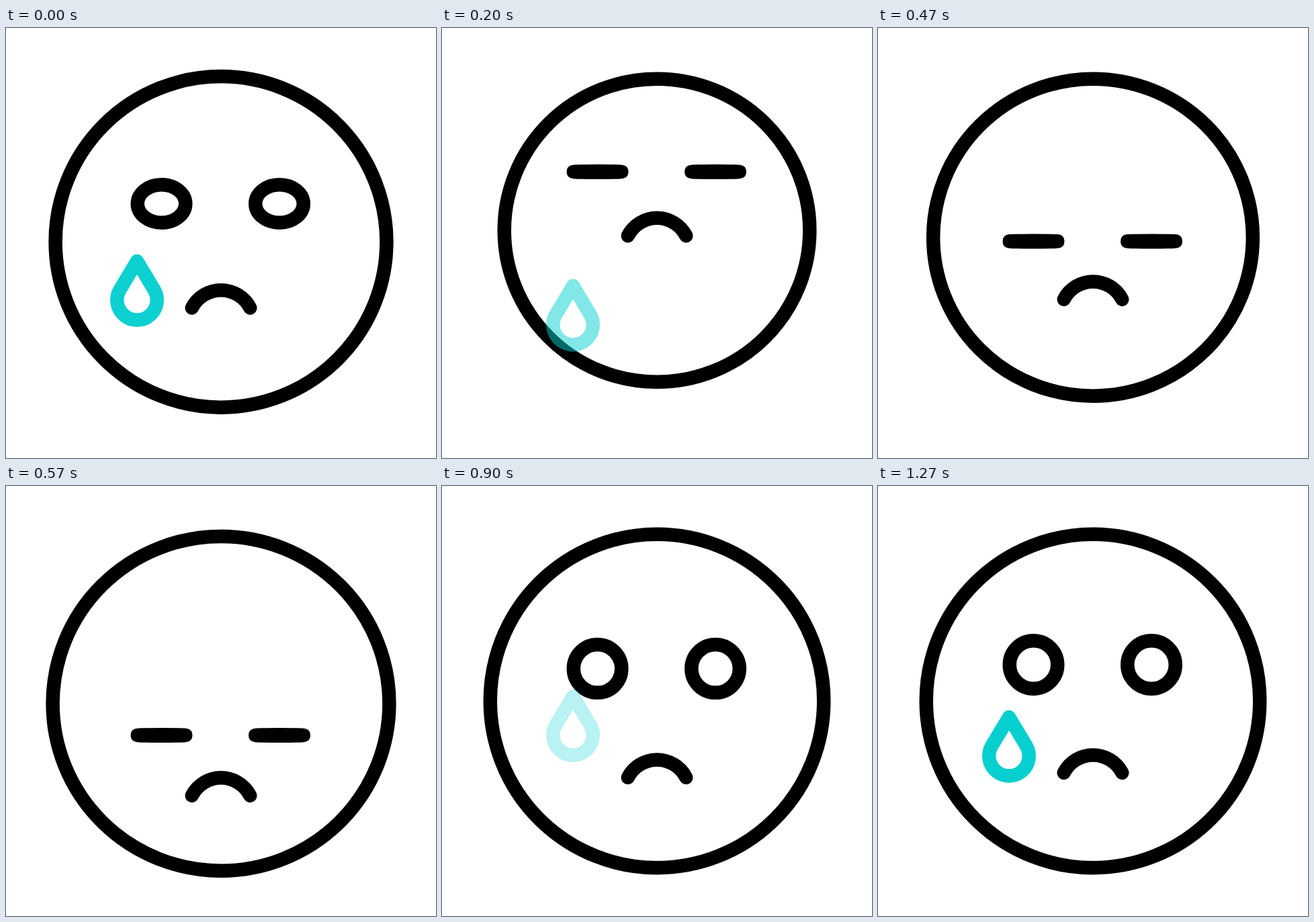
Write an HTML page that moves like this. It is 640 px wide and 640 px high and loops after 1.67 s.

```html
<!DOCTYPE html>
<html lang="en">
<head>
<meta charset="utf-8">
<title>Crying face</title>
<style>
  html, body { margin: 0; width: 100%; height: 100%; overflow: hidden; background: #fff; }
  svg { display: block; width: 100vw; height: 100vh; }
  .line { fill: none; stroke: #000; stroke-width: 20.5; stroke-linecap: round; stroke-linejoin: round; }
  #tear { stroke: #05cfcf; }
</style>
</head>
<body>
<svg viewBox="0 0 640 640">
  <ellipse class="line" id="face" cx="320"/>
  <ellipse class="line eye" cx="231.5" rx="35.75"/>
  <ellipse class="line eye" cx="407" rx="35.75"/>
  <path class="line" id="mouth" d="M276.7 426.8A48.7 48.7 0 0 1 363.3 426.8"/>
  <path class="line" id="tear" d="M195 344.3L169.4 387A29.75 29.75 0 1 0 220.6 387Z"/>
</svg>
<script>
const LOOP = 1670, LAST = 38;
const START = -0.7, TURN = 9.5; // in steps: the head starts to rise, then to sink

const $ = id => document.getElementById(id);
const face = $('face'), mouth = $('mouth'), tear = $('tear');
const eyes = document.querySelectorAll('.eye');

const set = (el, attrs) => {
  for (const key in attrs) el.setAttribute(key, attrs[key]);
};

// Smooth 0 to 1 between two times
function ease(t, from, to) {
  const u = Math.min(1, Math.max(0, (t - from) / (to - from)));
  return u * u * (3 - 2 * u);
}

// Weights of the raised and the sunken pose; sinking ends at low, the way home runs from leave to home
function nod(t, low, leave, home) {
  const sink = ease(t, TURN, low);
  return { up: ease(t, START, TURN) - sink, down: sink - ease(t, leave, home) };
}

function drawFace(t) {
  const { up, down } = nod(t, 22.6, 22.6, 27.5);
  const top = 71.75 + 4.7 * up + 2.6 * down;
  const bottom = 568.25 - 48.9 * up + 25.5 * down;
  set(face, {
    rx: 248.25 - 24.7 * up + 12.8 * down,
    cy: (top + bottom) / 2,
    ry: (bottom - top) / 2
  });
}

function drawEyes(t) {
  const { up, down } = nod(t, 18.4, 18.4, 29.6);
  const shut = ease(t, START, 5) - ease(t, 18.4, 24);
  eyes.forEach(eye => set(eye, { cy: 266 - 61.2 * up + 106 * down, ry: 35.75 - 35 * shut }));
}

function drawMouth(t) {
  const { up, down } = nod(t, 18.5, 23, 30);
  set(mouth, { transform: `translate(0 ${35.5 * down - 138.4 * up})` });
}

// The tear falls away, then a new one slides in from above
function drawTear(t) {
  const out = ease(t, START, 14.7), back = ease(t, 21.5, 40);
  const y = out < 1 ? 79 * out : 43.6 * (back - 1);
  set(tear, { transform: `translate(0 ${y})`, opacity: 1 - out + back });
}

function draw(ms) {
  // 30 steps per second on a 10 ms clock, then a rest until the loop ends
  const step = Math.min(LAST, Math.floor(0.3 * (Math.floor(ms / 10) + 0.5)));
  for (const part of [drawFace, drawEyes, drawMouth, drawTear]) part(step + 1);
}

const start = performance.now();
function tick() {
  draw((performance.now() - start) % LOOP);
  requestAnimationFrame(tick);
}
tick();
</script>
</body>
</html>
```
